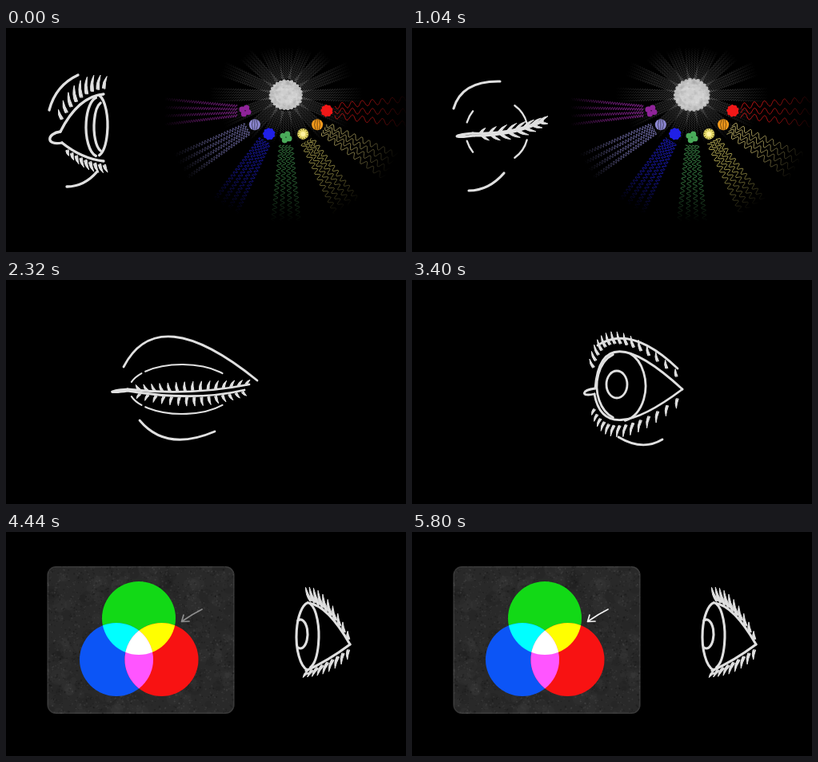
An HTML page with a canvas for the animation above (5880 ms loop, 500 px wide and 281 px high).

```html
<!DOCTYPE html>
<html lang="en">
<head>
<meta charset="utf-8">
<title>Eye and colour</title>
<style>
  html, body { margin: 0; width: 100%; height: 100%; overflow: hidden; background: #000; }
  canvas { display: block; width: 100vw; height: 100vh; }
</style>
</head>
<body>
<canvas id="stage"></canvas>
<script>
const W = 500, H = 281, LOOP = 5880, STEP = 80;
const scale = Math.max(1, window.devicePixelRatio || 1);
const TAU = Math.PI * 2, DEG = Math.PI / 180;

const clamp = v => Math.min(1, Math.max(0, v));
const ramp = (t, a, b) => clamp((t - a) / (b - a));
const easeOut = u => 1 - (1 - u) ** 2;
const polar = ([x, y], a, rx, ry = rx) => [x + rx * Math.cos(a), y + ry * Math.sin(a)];

// Blends numbers and arrays of numbers alike
const mix = (a, b, u) => Array.isArray(a) ? a.map((v, i) => mix(v, b[i], u)) : a + (b - a) * u;

function seeded(seed) {
  return () => {
    seed = (seed + 0x6D2B79F5) | 0;
    let r = Math.imul(seed ^ (seed >>> 15), 1 | seed);
    r = (r + Math.imul(r ^ (r >>> 7), 61 | r)) ^ r;
    return ((r ^ (r >>> 14)) >>> 0) / 4294967296;
  };
}

function prepare(canvas) {
  canvas.width = Math.round(W * scale);
  canvas.height = Math.round(H * scale);
  const g = canvas.getContext('2d');
  g.scale(canvas.width / W, canvas.height / H);
  return g;
}
const ctx = prepare(document.getElementById('stage'));

function disc(g, [x, y], r, fill) {
  g.beginPath();
  g.arc(x, y, r, 0, TAU);
  if (fill) { g.fillStyle = fill; g.fill(); }
}

// ---------- Eye ----------
// Curves (lid, low, brow, fold): start, control, end.
// Ellipses (ball, iris, pupil): centre, radii, angle range.
// socket: centre, radii, angle range of its front arcs.
// Lashes (up, down): count, gap, first and last length, first and last angle.
const side = {
  width: 3.3, open: 1, crease: 1, loop: 17,
  lid: [68, 130, 90, 86, 122, 83], low: [70, 144, 95, 164, 122, 167],
  brow: [54, 103, 62, 72, 90, 59], fold: [76, 199, 98, 199, 114, 180],
  ball: [113, 122, 14, 39, -75, 75], iris: [115, 124, 15, 37, 100, 260],
  pupil: [121, 124, 11, 31, 105, 255], socket: [106, 130, 39, 40, 15, 55],
  up: [9, 8, 18, 22, -110, -75], down: [9, 6, 10, 14, 75, 65]
};

const sideShut = {
  ...side, width: 3.1, open: 0, loop: 26,
  lid: [76, 132, 125, 134, 163, 116], low: [78, 135, 128, 135, 163, 117],
  brow: [52, 101, 62, 66, 110, 67], fold: [71, 204, 96, 204, 115, 182],
  up: [8, 0, 13, 16, -48, -35], down: [8, 0, 15, 13, 35, 12]
};

const left = {
  width: 2.8, open: 1, crease: 1, loop: 17,
  lid: [229, 136, 236, 43, 338, 137], low: [228, 143, 240, 211, 338, 137],
  brow: [232, 82, 274, 55, 332, 111], fold: [258, 197, 288, 215, 313, 200],
  ball: [261, 133, 31, 44, -68, 80], iris: [262, 133, 31, 42, 110, 250],
  pupil: [256, 131, 13, 17, -180, 180], socket: [220, 137, 66, 31, 40, 134],
  up: [15, 11, 16, 13, -115, -98], down: [14, 8, 11, 17, 115, 95]
};

function widen(pose, edge, k) {
  const wide = { ...pose }, fx = x => edge + (x - edge) * k;
  for (const name of ['lid', 'low', 'brow', 'fold']) wide[name] = pose[name].map((v, i) => i % 2 ? v : fx(v));
  for (const name of ['ball', 'iris', 'pupil']) {
    const [x, y, rx, ...rest] = pose[name];
    wide[name] = [fx(x), y, rx * k, ...rest];
  }
  return wide;
}
const front = widen(left, 338, 1.45);

const frontShut = {
  ...front, open: 0, loop: 25,
  lid: [152, 137, 228, 146, 304, 131], low: [152, 139, 235, 153, 298, 138],
  brow: [147, 109, 190, 25, 314, 126], fold: [167, 176, 200, 216, 261, 190],
  up: [15, 1, 11, 11, -125, -50], down: [15, 2, 10, 10, 125, 45]
};

const far = {
  ...left, width: 3.1, crease: 0, loop: 0,
  lid: [378, 89, 402, 92, 430, 141], low: [375, 174, 402, 162, 430, 141],
  ball: [377, 130, 14, 41, -75, 75], iris: [380, 131, 17, 43, 100, 260],
  pupil: [368, 128, 9, 18, -110, 110], socket: [381, 135, 39, 40, 125, 165],
  up: [10, 4, 26, 14, -112, -95], down: [9, 6, 12, 17, 130, 95]
};

const farShut = {
  ...far, open: 0,
  lid: [324, 121, 362, 139, 411, 137], low: [324, 122, 360, 141, 411, 140],
  up: [8, 0, 14, 12, -145, -130], down: [8, 0, 13, 13, 170, 140]
};

// time, pose, shift, easing into this key
const keys = [
  [0, side, 0], [400, side, 0], [640, sideShut, 0], [1440, sideShut, 0],
  [2320, frontShut, 0, easeOut], [2560, frontShut, 26], [2640, frontShut, 26],
  [2960, front, 0], [3080, front, 0], [3400, left, 0], [4200, far, 20],
  [4360, far, 0], [4840, far, 0], [4920, farShut, 0], [5000, farShut, 0],
  [5160, far, 0], [LOOP, far, 0]
];

function poseAt(t) {
  const i = keys.findIndex(k => k[0] > t);
  const [t0, a, dx0] = keys[i - 1], [t1, b, dx1, ease = u => u] = keys[i];
  const u = ease(ramp(t, t0, t1)), pose = { shift: mix(dx0, dx1, u) };
  for (const name in a) pose[name] = mix(a[name], b[name], u);
  return pose;
}

const onCurve = ([x0, y0, cx, cy, x1, y1], s) =>
  mix(mix([x0, y0], [cx, cy], s), mix([cx, cy], [x1, y1], s), s);

function strokeCurve([x0, y0, ...rest]) {
  ctx.beginPath();
  ctx.moveTo(x0, y0);
  ctx.quadraticCurveTo(...rest);
  ctx.stroke();
}

function strokeArc([x, y, rx, ry, from, to]) {
  ctx.beginPath();
  ctx.ellipse(x, y, rx, ry, 0, from * DEG, to * DEG);
  ctx.stroke();
}

// Tapered, slightly curved hairs standing along a lid
function drawLashes(lid, [count, gap, len0, len1, a0, a1], width, sign) {
  const n = Math.round(count);
  ctx.lineWidth = 1;
  for (let k = 0; k < n; k++) {
    const s = k / (n - 1), a = mix(a0, a1, s) * DEG;
    const len = mix(len0, len1, s) * (0.7 + 0.35 * Math.sin(Math.PI * s));
    const base = polar(onCurve(lid, 0.1 + 0.87 * s), a, gap);
    const tip = polar(base, a, len), mid = polar(base, a - sign * 0.25, len / 2);
    const across = a + Math.PI / 2, w = width * 0.55;
    ctx.beginPath();
    ctx.moveTo(...polar(base, across, w));
    ctx.quadraticCurveTo(...polar(mid, across, w), ...tip);
    ctx.quadraticCurveTo(...polar(mid, across, -w), ...polar(base, across, -w));
    ctx.closePath();
    ctx.fill();
    ctx.stroke();
  }
}

function drawEye(t) {
  const p = poseAt(t);
  ctx.save();
  ctx.translate(p.shift, 0);
  ctx.strokeStyle = ctx.fillStyle = '#e0e0e0';
  ctx.lineCap = ctx.lineJoin = 'round';
  ctx.lineWidth = p.width;

  strokeCurve(p.lid);
  strokeCurve(p.low);
  ctx.globalAlpha = clamp(p.loop / 17);
  const [x0, y0] = p.lid, [x1, y1] = p.low;
  ctx.beginPath();
  ctx.moveTo(x0, y0);
  ctx.bezierCurveTo(x0 - p.loop, y0 + 2, x0 - p.loop - 2, y1 + 4, x1, y1);
  ctx.stroke();

  ctx.globalAlpha = p.open;
  [p.ball, p.iris, p.pupil].forEach(strokeArc);

  ctx.globalAlpha = p.crease;
  strokeCurve(p.brow);
  strokeCurve(p.fold);

  ctx.globalAlpha = 1 - p.open;
  ctx.lineWidth = p.width * 0.75;
  const [cx, cy, rx, ry, from, to] = p.socket;
  for (const [a, b] of [[from, to], [-to, -from], [140, 163], [-163, -140]]) strokeArc([cx, cy, rx, ry, a, b]);

  ctx.globalAlpha = 1;
  drawLashes(p.lid, p.up, p.width, 1);
  drawLashes(p.low, p.down, p.width, -1);
  ctx.restore();
}

// ---------- Light ----------
const SUN = [350, 84], BEAM_CENTRE = [350, 105];
const tints = ['#8f2499', '#8d88d2', '#2020e6', '#4aab5a', '#e6d96a', '#f59a1c', '#f01818'];
const kinds = ['clover', 'stripes', 'cluster', 'clover', 'rim', 'stripes', 'cluster'];

// Balls and beam ends both lie on ellipses; wavelength grows from violet to red.
const beams = tints.map((tint, k) => ({
  tint,
  kind: kinds[k],
  glow: k === 5 ? '#dfcf78' : tint,
  ball: polar(SUN, (158 - k * 136 / 6) * DEG, 55, 53),
  end: polar(BEAM_CENTRE, (180 - k * 30) * DEG, 152, 138),
  length: 3 * 1.27 ** k,
  amp: 1.7 + 0.33 * k,
  lines: k === 6 ? 3 : 4
}));

function drawWave(p, q, length, amp, color, t) {
  const dx = q[0] - p[0], dy = q[1] - p[1], dist = Math.hypot(dx, dy);
  const fade = ctx.createLinearGradient(...p, ...q);
  fade.addColorStop(0, color);
  fade.addColorStop(0.5, color + 'b8');
  fade.addColorStop(1, color + '00');
  ctx.strokeStyle = fade;
  ctx.beginPath();
  for (let s = 0; s <= dist; s += 0.6) {
    const w = amp * Math.sin(TAU * (s / length - t / 640));
    ctx.lineTo(p[0] + (dx * s - dy * w) / dist, p[1] + (dy * s + dx * w) / dist);
  }
  ctx.stroke();
}

function drawBeam({ ball, end, glow, length, amp, lines }, t) {
  const a = Math.atan2(end[1] - ball[1], end[0] - ball[0]), from = polar(ball, a, 10);
  for (let k = 0; k < lines; k++) {
    const off = 2 * k / (lines - 1) - 1, across = a + Math.PI / 2;
    drawWave(polar(from, across, off * 6), polar(end, across, off * 16), length, amp, glow, t);
  }
}

function drawBall({ ball, tint, kind }) {
  const ring = (n, r, size, fill) => {
    for (let k = 0; k < n; k++) disc(ctx, polar(ball, k * TAU / n + 0.4, r), size, fill);
  };
  if (kind === 'clover') return ring(4, 4.2, 3.6, tint);
  disc(ctx, ball, 7, tint);
  if (kind === 'cluster') ring(9, 6, 1.8, tint);
  if (kind === 'rim') {
    ring(12, 5.8, 0.7, '#5d5410');
    disc(ctx, ball, 3, '#fff3a0');
  }
  if (kind === 'stripes') {
    const [x, y] = ball;
    ctx.strokeStyle = 'rgba(0,0,0,.55)';
    for (const w of [-3.5, 0, 3.5]) strokeCurve([x + w * 0.6, y - 6.5, x + w * 1.4, y, x + w * 0.6, y + 6.5]);
  }
}

function drawSun(pulse) {
  const rnd = seeded(7);
  ctx.save();
  ctx.translate(...SUN);
  ctx.scale(1.06 * pulse, 0.96 * pulse);
  for (let k = 0; k < 26; k++) disc(ctx, polar([0, 0], k * TAU / 26, 17.6 + rnd()), 2.2, '#b9b9b9');
  disc(ctx, [0, 0], 18.5, '#c4c4c4');
  disc(ctx, [0, 0], 13, '#cecece');
  for (let k = 0; k < 150; k++) {
    disc(ctx, polar([0, 0], rnd() * TAU, 18 * Math.sqrt(rnd())), 0.8 + rnd() * 1.6,
      rnd() < 0.5 ? 'rgba(255,255,255,.12)' : 'rgba(140,140,140,.12)');
  }
  ctx.restore();
}

function drawLight(t) {
  const alpha = 1 - ramp(t, 1600, 2040);
  if (!alpha) return;
  const swell = Math.sin(Math.PI * t / 2080) ** 2;
  ctx.lineWidth = 0.8;
  ctx.globalAlpha = alpha * 0.25;
  for (let k = 0; k < 16; k++) {
    const a = k * TAU / 16, across = a + Math.PI / 2;
    const reach = 1 / Math.hypot(Math.cos(a) / 96, Math.sin(a) / 60);
    for (let j = -2; j <= 2; j++) {
      drawWave(polar(polar(SUN, a, 20), across, j * 2.4), polar(polar(SUN, a, reach), across, j * 4),
        3, 1.2, '#ffffff', t);
    }
  }
  ctx.lineWidth = 0.95;
  ctx.globalAlpha = alpha * (0.8 + 0.12 * swell);
  beams.forEach(b => drawBeam(b, t));
  ctx.globalAlpha = alpha;
  beams.forEach(drawBall);
  drawSun(1 + 0.08 * swell);
  ctx.globalAlpha = 1;
}

// ---------- Colour panel ----------
const R = 46;
const lamps = [
  { at: [166, 108], color: '#12d916' },
  { at: [138, 160], color: '#0c55f6' },
  { at: [194.5, 160], color: '#f81212' }
];
const overlaps = [[0, 1, '#00ffff'], [0, 2, '#ffff00'], [1, 2, '#ff55ff']];

function makePanel() {
  const canvas = document.createElement('canvas'), g = prepare(canvas), rnd = seeded(21);
  const spots = (n, size, dark, light) => {
    for (let k = 0; k < n; k++) {
      disc(g, [50 + rnd() * 237, 42 + rnd() * 188], size * (0.4 + rnd()),
        rnd() < 0.5 ? `rgba(0,0,0,${dark})` : `rgba(255,255,255,${light})`);
    }
  };
  g.save();
  g.beginPath();
  g.roundRect(51.5, 43, 234, 185, 11);
  g.fillStyle = '#292929';
  g.fill();
  g.clip();
  g.strokeStyle = 'rgba(110,110,110,.25)';
  g.lineWidth = 3;
  g.stroke();
  spots(260, 7, 0.07, 0.018);
  spots(2600, 0.9, 0.2, 0.055);
  g.restore();

  // Fills one lamp inside the area shared with the others
  const shared = (inside, lamp, color) => {
    g.save();
    for (const k of inside) { disc(g, lamps[k].at, R); g.clip(); }
    disc(g, lamps[lamp].at, R, color);
    g.restore();
  };
  lamps.forEach(({ color }, k) => shared([], k, color));
  for (const [a, b, color] of overlaps) shared([a], b, color);
  shared([0, 1], 2, '#fff');
  return canvas;
}
const panel = makePanel();

function drawPanel(t) {
  if (t < 3480) return;
  ctx.drawImage(panel, -290 * (1 - ramp(t, 3480, 4360)) ** 3, 0, W, H);
}

function drawArrow(t) {
  const alpha = ramp(t, 4360, 4520) - ramp(t, 4920, 5080) + ramp(t, 5480, 5640);
  if (!alpha) return;
  ctx.globalAlpha = alpha;
  ctx.strokeStyle = '#f2f2f2';
  ctx.lineWidth = 1.7;
  ctx.lineCap = ctx.lineJoin = 'round';
  ctx.beginPath();
  ctx.moveTo(245, 97);
  ctx.quadraticCurveTo(233, 103, 220, 112);
  ctx.moveTo(222, 104);
  ctx.lineTo(219.5, 112.5);
  ctx.lineTo(229, 112);
  ctx.stroke();
  ctx.globalAlpha = 1;
}

// ---------- Loop ----------
// Poses advance in fixed steps, with one longer hold before the turn.
function stepped(t) {
  const from = t < 3160 ? 0 : 3160;
  const s = from + Math.floor((t - from) / STEP) * STEP;
  return from ? s : Math.min(s, 2960);
}

function frame(now) {
  const t = stepped(now % LOOP);
  ctx.fillStyle = '#000';
  ctx.fillRect(0, 0, W, H);
  drawLight(t);
  drawPanel(t);
  drawArrow(t);
  drawEye(t);
}

let start;
function run(now) {
  start ??= now;
  frame(Math.max(0, now - start));
  requestAnimationFrame(run);
}
frame(0);
requestAnimationFrame(run);
</script>
</body>
</html>
```
